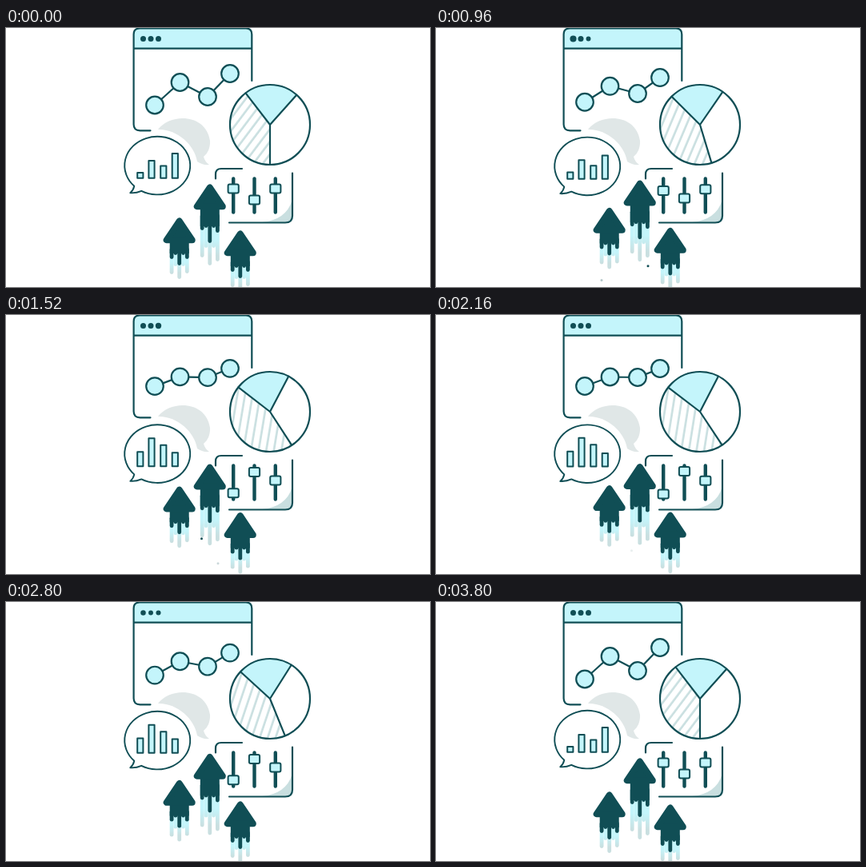
An HTML page that plays this animation: 530x324 px, repeating every 3840 ms.

```html
<!DOCTYPE html>
<html lang="en">
<head>
<meta charset="utf-8">
<title>Analytics illustration</title>
<style>
  html, body { margin: 0; width: 100%; height: 100%; overflow: hidden; background: #fff; }
  svg { display: block; }
  .ink { stroke: #104e55; stroke-width: 2.2; fill: none; stroke-linecap: round; stroke-linejoin: round; }
  .cyan { fill: #c4f5fb; }
  .dark { fill: #104e55; }
  .mist { fill: #c9dfe0; }
</style>
</head>
<body>
<svg id="stage" width="530" height="324" viewBox="0 0 530 324">
  <defs>
    <pattern id="hatch" width="9.4" height="9.4" patternUnits="userSpaceOnUse">
      <rect class="mist" x="3" width="2.6" height="9.4"/>
    </pattern>
  </defs>

  <g id="browser">
    <path class="cyan" d="M159.600 25.500V8Q159.600 .5 167 .5H300Q307.300 .5 307.300 8V25.500Z"/>
    <path class="ink" d="M307.300 66V8Q307.300 .5 300 .5H167Q159.600 .5 159.600 8V120.500Q159.600 128.300 167.500 128.300H180.500M159.600 25.700H307.300"/>
    <polyline id="trend" class="ink"/>
  </g>

  <path fill="#e0e7e7" d="M190 127C206 106 250 107 255 141C255.500 150 252 157 247 161Q249 168 254 171Q246 172 239 167C236 146 213 126 190 127Z"/>

  <g id="bubble">
    <path class="ink" transform="translate(.8 .8)" style="stroke-width:1.900;fill:#fff" d="M159.500 197A41 36.300 0 1 1 168.500 203Q162 206 154.500 205.500Q158.500 202 159.500 197Z"/>
  </g>

  <g id="pie">
    <path id="hatched" fill="url(#hatch)"/>
    <path id="slice" class="cyan"/>
    <path id="spokes" class="ink"/>
    <circle class="ink" cx="330" cy="121" r="50"/>
  </g>

  <g id="panel">
    <path class="mist" d="M357.500 216V235Q357.500 243 349 243H320Q350 240 357.500 216Z"/>
    <path class="ink" d="M262 188.500V183Q262 176 269 176H295M358 181.500V235Q358 243.500 349 243.500H279"/>
  </g>
  <g id="rockets"></g>
</svg>

<script>
const LOOP = 3840;
const $ = id => document.getElementById(id);

function add(parent, tag, attrs) {
  const el = document.createElementNS("http://www.w3.org/2000/svg", tag);
  return parent.appendChild(set(el, attrs));
}
function set(el, attrs) {
  for (const key in attrs) el.setAttribute(key, attrs[key]);
  return el;
}

const clamp = v => Math.min(1, Math.max(0, v));
const mix = (a, b, k) => a + (b - a) * k;
const ease = (p, power) => p < .5
  ? Math.pow(2 * p, power) / 2
  : 1 - Math.pow(2 - 2 * p, power) / 2;
// Goes from 0 to 1 after `out`, and back to 0 after `back`.
const swing = (t, out, back, length, power) =>
  ease(clamp((t - out) / length), power) - ease(clamp((t - back) / length), power);

const dots = [171.5, 181, 190.5].map(cx =>
  add($("browser"), "circle", { class: "dark", cx, cy: 13.5 }));

const points = [[186, 96.5, 89], [217.5, 68, 77.5], [252, 86, 78], [280, 57, 67]]
  .map(([x, from, to]) => ({ x, from, to,
    el: add($("browser"), "circle", { class: "ink cyan", style: "fill:#c4f5fb", cx: x, r: 10.8 }) }));

const bars = [[164.2, 181, 169], [178.4, 166, 152], [193.2, 172.6, 160.7], [207.7, 157, 171.3]]
  .map(([x, from, to]) => ({ from, to,
    el: add($("bubble"), "rect", { class: "ink", style: "fill:#c4f5fb;stroke-width:2", x, width: 7.2 }) }));

const knobs = [[284.2, 201, 224], [310.5, 215, 195.5], [336.8, 201, 207.2]]
  .map(([x, from, to]) => {
    add($("panel"), "path", { class: "ink", style: "stroke-width:4.4", d: `M${x} 188.500V230.500` });
    return { from, to, el: add($("panel"), "rect",
      { class: "ink", style: "fill:#c4f5fb;stroke-width:2", x: x - 6.6, width: 13.2, height: 11, rx: 2 }) };
  });

// Each rocket trails five round-ended streaks: [light end, dark end].
const shortTrail = [[71, 52], [61, 47], [77, 60], [61, 47], [70, 52]];
const longTrail = [[92, 58], [80, 55], [102, 74], [80, 55], [97, 61]];
const rockets = [[216.7, 237, 212, shortTrail], [254.8, 195, 185.3, longTrail], [292.8, 253, 246, shortTrail]]
  .map(([x, from, to, trail], i) => {
    const el = add($("rockets"), "g", {});
    const top = trail[1][1], bottom = trail[2][0];
    const fade = add(el, "linearGradient",
      { id: "fade" + i, gradientUnits: "userSpaceOnUse", x1: 0, x2: 0, y1: top, y2: bottom });
    add(fade, "stop", { offset: .3, "stop-color": "#c4f5fb" });
    add(fade, "stop", { offset: .75, "stop-color": "#c9dfe0" });
    const streak = (col, end, color) => add(el, "path",
      { d: `M${(col - 2) * 4.8} 40V${end - 2.4}`, stroke: color, "stroke-width": 4.8, "stroke-linecap": "round" });
    trail.forEach(([end], col) => streak(col, end, `url(#fade${i})`));
    trail.forEach(([, end], col) => streak(col, end, "#104e55"));
    add(el, "rect", { class: "dark", x: -12, y: 27, width: 24, height: top - 29 });
    add(el, "path", { class: "ink dark", style: "fill:#104e55;stroke-width:8", d: "M0 4.500L-16 28.300H16Z" });
    return { x, from, to, el };
  });

const drops = [[207, 300, 300], [265, 294, 800], [244.5, 276, 1360]]
  .map(([cx, y, start]) => ({ y, start, el: add($("rockets"), "circle", { class: "dark", cx, r: 1.5 }) }));

function drawPie(k) {
  const rim = deg => {
    const a = deg * Math.PI / 180;
    return `${330 + 50 * Math.cos(a)} ${121 + 50 * Math.sin(a)}`;
  };
  const low = rim(90 - 33.5 * k), left = rim(232.4 - 15 * k), right = rim(311.7 - 14.3 * k);
  const sector = (a, b) => `M330 121L${a}A50 50 0 0 1 ${b}Z`;
  set($("hatched"), { d: sector(low, left) });
  set($("slice"), { d: sector(left, right) });
  set($("spokes"), { d: [low, left, right].map(p => "M330 121L" + p).join("") });
  set($("hatch"), { patternTransform: `rotate(${37 - 28 * k} 330 121)` });
}

function draw(t) {
  const chart = swing(t, 140, 2080, 1640, 3);
  const level = swing(t, 600, 2520, 1200, 3);
  const lift = swing(t, 0, 1920, 1920, 2);

  points.forEach(p => set(p.el, { cy: p.y = mix(p.from, p.to, chart) }));
  set($("trend"), { points: points.map(p => `${p.x},${p.y}`).join(" ") });
  drawPie(chart);

  // Each dot shrinks, then overshoots, one after the other.
  const pulse = (start, length) => Math.sin(2 * Math.PI * clamp((t - start) / length));
  dots.forEach((dot, i) => {
    const wave = pulse(360 + 200 * i, 800) + pulse(2480 + 100 * i, 760);
    set(dot, { r: 3.5 * (1 - .16 * wave) });
  });

  set($("bubble"), { transform: `translate(0 ${1.7 * lift})` });
  bars.forEach(b => {
    const y = mix(b.from, b.to, level);
    set(b.el, { y, height: 187.8 - y });
  });
  knobs.forEach(n => set(n.el, { y: mix(n.from, n.to, level) - 5.5 }));

  rockets.forEach(r => set(r.el, { transform: `translate(${r.x} ${mix(r.from, r.to, lift)})` }));
  drops.forEach(d => {
    const u = (t - d.start) / 900;
    set(d.el, { cy: d.y + 21 * u, opacity: u > 0 && u < 1 ? clamp(1.3 - 1.35 * u) : 0 });
  });
}

function tick() {
  draw(performance.now() % LOOP);
  requestAnimationFrame(tick);
}
tick();
</script>
</body>
</html>
```
